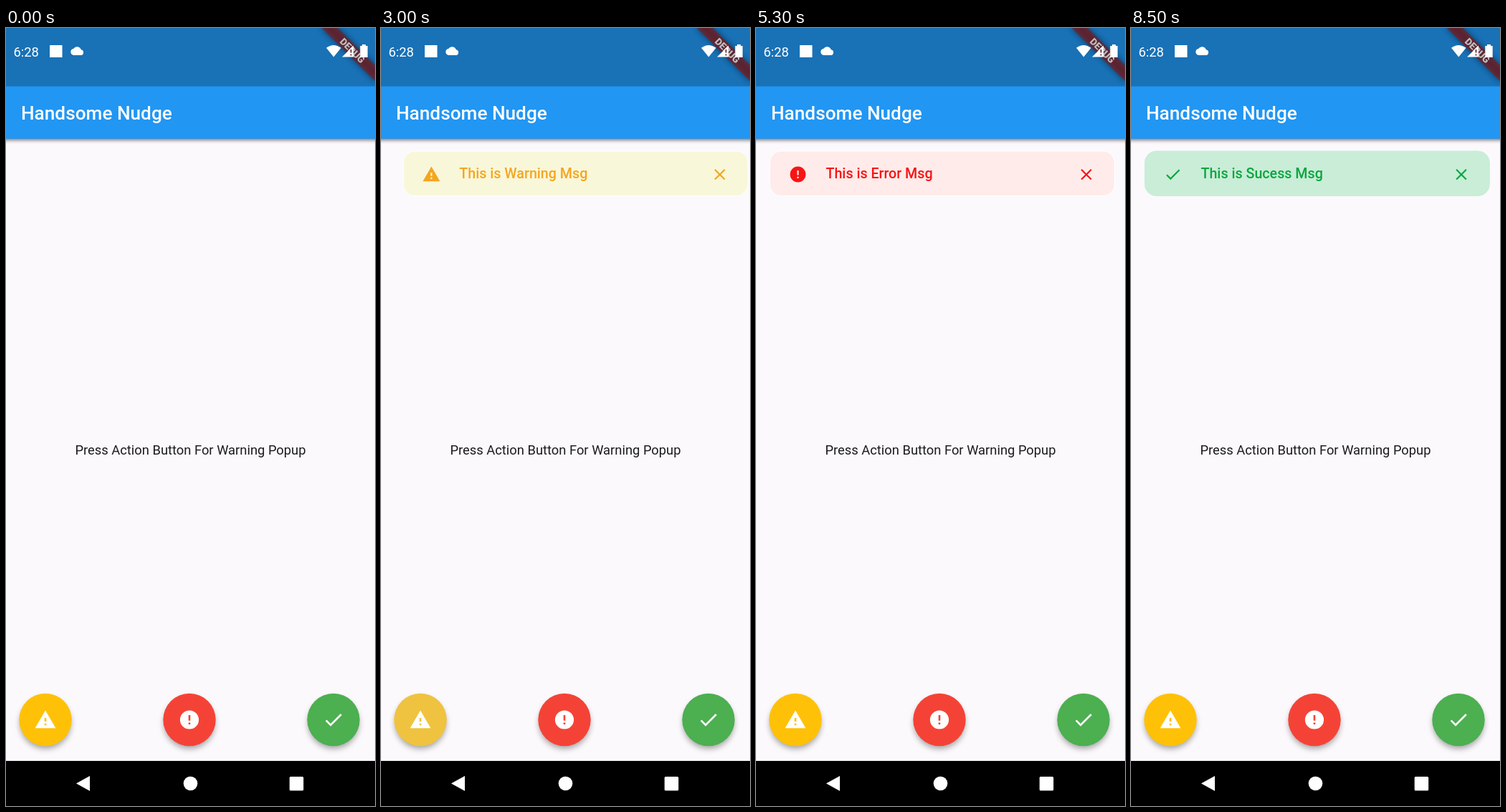
An HTML page that plays this animation: 515 by 1087 pixels, repeating every 8600 ms.

```html
<!DOCTYPE html>
<html lang="en">
<head>
<meta charset="utf-8">
<title>Toast demo</title>
<style>
  html, body { margin: 0; width: 100%; height: 100%; overflow: hidden; background: #fbf9fc; }
  svg { display: block; width: 100vw; height: 100vh; }
  text { font-family: Roboto, sans-serif; }
</style>
</head>
<body>
<svg viewBox="0 0 515 1087">
  <defs>
    <path id="warning" d="M1 21h22L12 2 1 21zm12-3h-2v-2h2v2zm0-4h-2v-4h2v4z"/>
    <path id="error" d="M12 2a10 10 0 1 0 0 20 10 10 0 0 0 0-20zm1 15h-2v-2h2v2zm0-4h-2V7h2v6z"/>
    <path id="check" d="M9 16.17L4.83 12l-1.42 1.41L9 19 21 7l-1.41-1.41z"/>
    <path id="close" d="M19 6.41L17.59 5 12 10.59 6.41 5 5 6.41 10.59 12 5 17.59 6.41 19 12 13.41 17.59 19 19 17.59 13.41 12z"/>
    <clipPath id="disc"><circle r="36.7"/></clipPath>
    <filter id="soft" x="-50%" y="-50%" width="200%" height="200%"><feGaussianBlur stdDeviation="4.5"/></filter>
    <filter id="thin" x="-10%" y="-50%" width="120%" height="200%"><feGaussianBlur stdDeviation="2.6"/></filter>
  </defs>

  <rect width="515" height="1087" fill="#fbf9fc"/>
  <text x="257.5" y="596" font-size="18.35" text-anchor="middle" fill="#1c1b1f">Press Action Button For Warning Popup</text>

  <!-- App bar with corner ribbon -->
  <rect x="-10" y="100" width="535" height="57" opacity=".5" filter="url(#thin)"/>
  <rect width="515" height="154.7" fill="#2196f3"/>
  <text x="21" y="128" font-size="26.2" font-weight="500" fill="#fff">Handsome Nudge</text>
  <g transform="translate(515 0) rotate(45)">
    <rect x="-52.4" y="36.7" width="104.9" height="15.7" opacity=".5" filter="url(#soft)"/>
    <rect x="-52.4" y="36.7" width="104.9" height="15.7" fill="#b71c1c" opacity=".627"/>
    <text y="49.3" font-size="13.4" font-weight="900" text-anchor="middle" fill="#fff">DEBUG</text>
  </g>

  <!-- Status bar -->
  <rect width="515" height="81.5" opacity=".25"/>
  <g fill="#fff">
    <text x="10.5" y="39.8" font-size="18.35">6:28</text>
    <rect x="61" y="24" width="17.5" height="17"/>
    <path d="M94.5 38a4.6 4.6 0 0 1-.4-9.1 6 6 0 0 1 10.7 1.4 3.9 3.9 0 0 1 0 7.7z"/>
    <path d="M457.3 40.5L447 27.7q10.3-7.6 20.6 0z"/>
    <path d="M485 24.5v16h-16z"/>
    <path d="M497 23h5v2h2.7v16h-10.4V25h2.7z"/>
  </g>
  <path d="M481.5 30v4.5M481.5 36.5v2" stroke="#5a1c28" stroke-width="1.6"/>

  <g id="buttons"></g>
  <g id="toasts"></g>

  <!-- Navigation bar -->
  <rect y="1024" width="515" height="63"/>
  <g fill="#fff">
    <path d="M98 1055.5l19-10.5v21z"/>
    <circle cx="257.5" cy="1055.5" r="9.8"/>
    <rect x="395.7" y="1046" width="19.5" height="19.5" rx="1.5"/>
  </g>
</svg>
<script>
const LOOP = 8600, STEP = 100, SLIDE = 600, TAP_LEAD = 100;

const items = [
  { icon: 'warning', label: 'Warning', x: 55, start: 2790, end: 4567,
    button: '#ffc107', fill: '#f9f7d9', ink: '#f5a51f', edge: '#fff' },
  { icon: 'error', label: 'Error', x: 256, start: 4567, end: 6720,
    button: '#f44336', fill: '#feebea', ink: '#f71414', edge: '#fff' },
  { icon: 'check', label: 'Sucess', x: 457, start: 6720, end: LOOP,
    button: '#4caf50', fill: '#c9edd7', ink: '#0aa640', edge: '#c9edd7' }
];

const icon = (name, x, y, scale) =>
  `<use href="#${name}" transform="translate(${x} ${y}) scale(${scale}) translate(-12 -12)"/>`;

const buttonMarkup = item => `
  <g transform="translate(${item.x} 966.5)">
    <circle class="shadow" r="35.5" cy="5" opacity=".36" filter="url(#soft)"/>
    <circle r="36.7" fill="${item.button}"/>
    <g clip-path="url(#disc)"><circle class="ripple" fill="#c8c8c8" opacity="0"/></g>
    <g fill="#fff">${icon(item.icon, 0, 0, 1.311)}</g>
  </g>`;

const toastMarkup = item => `
  <g fill="${item.ink}">
    <rect x="19.3" y="172" width="481" height="62.5" rx="16" fill="${item.fill}" stroke="${item.edge}"/>
    ${icon(item.icon, 58.5, 204.5, 1.092)}
    <text x="97.5" y="210" font-size="19.66" font-weight="500">This is ${item.label} Msg</text>
    ${icon('close', 461, 204.7, 1.092)}
  </g>`;

const buttons = document.getElementById('buttons');
const toasts = document.getElementById('toasts');
buttons.innerHTML = items.map(buttonMarkup).join('');
toasts.innerHTML = items.map(toastMarkup).join('');

const clamp = v => Math.min(1, Math.max(0, v));
const backOut = t => 1 + 2.70158 * (t - 1) ** 3 + 1.70158 * (t - 1) ** 2;

function drawButton(node, age) {
  const ripple = node.querySelector('.ripple');
  const shadow = node.querySelector('.shadow');
  const grow = clamp((age + TAP_LEAD) / 330);
  const fade = clamp((age - 150) / 220);
  const pressed = age > -TAP_LEAD && age < 60;
  ripple.setAttribute('r', 57 * grow);
  ripple.setAttribute('cx', 52 * (1 - grow));
  ripple.setAttribute('cy', 29 * (1 - grow));
  ripple.setAttribute('opacity', grow > 0 ? 0.4 * (1 - fade) : 0);
  shadow.setAttribute('cy', pressed ? 8 : 5);
}

function drawToast(node, item, time) {
  const visible = time >= item.start && time < item.end;
  const offset = 515 * (1 - backOut(clamp((time - item.start) / SLIDE)));
  node.setAttribute('display', visible ? 'inline' : 'none');
  node.setAttribute('transform', `translate(${offset.toFixed(2)} 0)`);
}

function draw(time) {
  items.forEach((item, i) => {
    drawButton(buttons.children[i], time - item.start);
    drawToast(toasts.children[i], item, time);
  });
}

let origin;
function tick(now) {
  origin ??= now;
  draw(Math.floor(((now - origin) % LOOP) / STEP) * STEP);
  requestAnimationFrame(tick);
}
draw(0);
requestAnimationFrame(tick);
</script>
</body>
</html>
```
